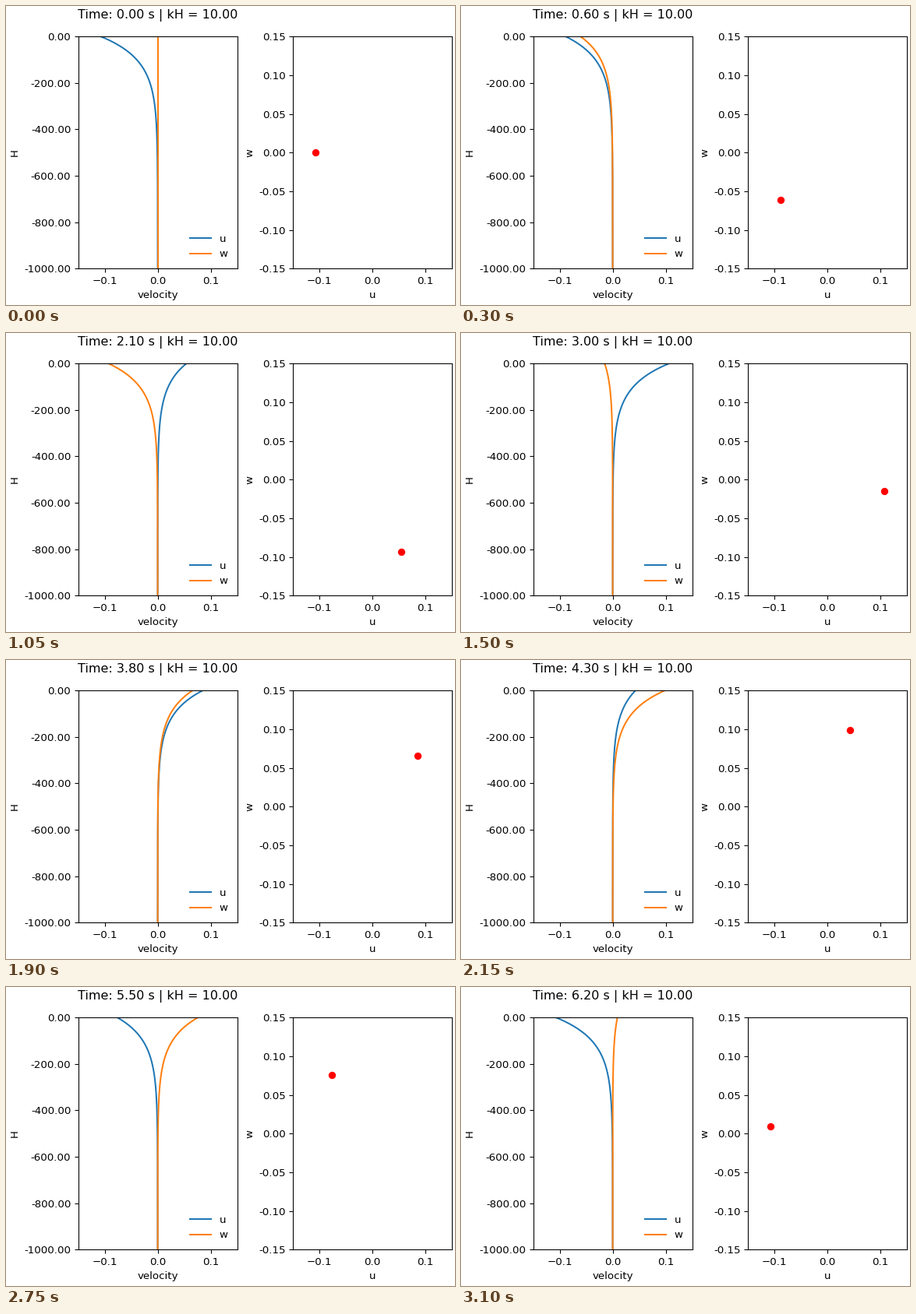
Write a matplotlib script that moves like this. It is 576 px wide and 384 px high and loops after 3.15 s.

```python
import numpy as np
import matplotlib.pyplot as plt
from matplotlib.animation import FuncAnimation
from matplotlib.ticker import FormatStrFormatter

WIDTH, HEIGHT, DPI = 576, 384, 96
DEPTH = 1000.0
KH = 10.0
AMP = 0.1077
LIM = 0.15
FRAMES = 63
DT = 0.1

plt.rcParams["font.family"] = "DejaVu Sans"

z = np.linspace(-DEPTH, 0, 500)
k = KH / DEPTH
u_profile = AMP * np.cosh(k * (z + DEPTH)) / np.cosh(KH)
w_profile = AMP * np.sinh(k * (z + DEPTH)) / np.sinh(KH)

fig, (ax_depth, ax_orbit) = plt.subplots(
    1, 2, figsize=(WIDTH / DPI, HEIGHT / DPI), dpi=DPI)
fig.subplots_adjust(left=92.67 / WIDTH, right=572 / WIDTH,
                    bottom=46.67 / HEIGHT, top=344.9 / HEIGHT,
                    wspace=71.67 / 203.83)

u_line, = ax_depth.plot([], [], label="u")
w_line, = ax_depth.plot([], [], label="w")
dot, = ax_orbit.plot([], [], "ro")

ax_depth.set(xlim=(-LIM, LIM), ylim=(-DEPTH, 0), xlabel="velocity", ylabel="H")
ax_orbit.set(xlim=(-LIM, LIM), ylim=(-LIM, LIM), xlabel="u", ylabel="w")
for ax in (ax_depth, ax_orbit):
    ax.yaxis.set_major_formatter(FormatStrFormatter("%.2f"))
ax_depth.legend(loc="lower right", frameon=False)
title = ax_depth.set_title("", y=1.05)


def update(i):
    t = i * DT
    u = -u_profile * np.cos(t)
    w = -w_profile * np.sin(t)
    u_line.set_data(u, z)
    w_line.set_data(w, z)
    dot.set_data([u[-1]], [w[-1]])
    title.set_text(f"Time: {t:.2f} s | kH = {KH:.2f}")
    return u_line, w_line, dot, title


anim = FuncAnimation(fig, update, frames=FRAMES, interval=50,
                     repeat=True, repeat_delay=0, blit=False)
plt.show()
```
